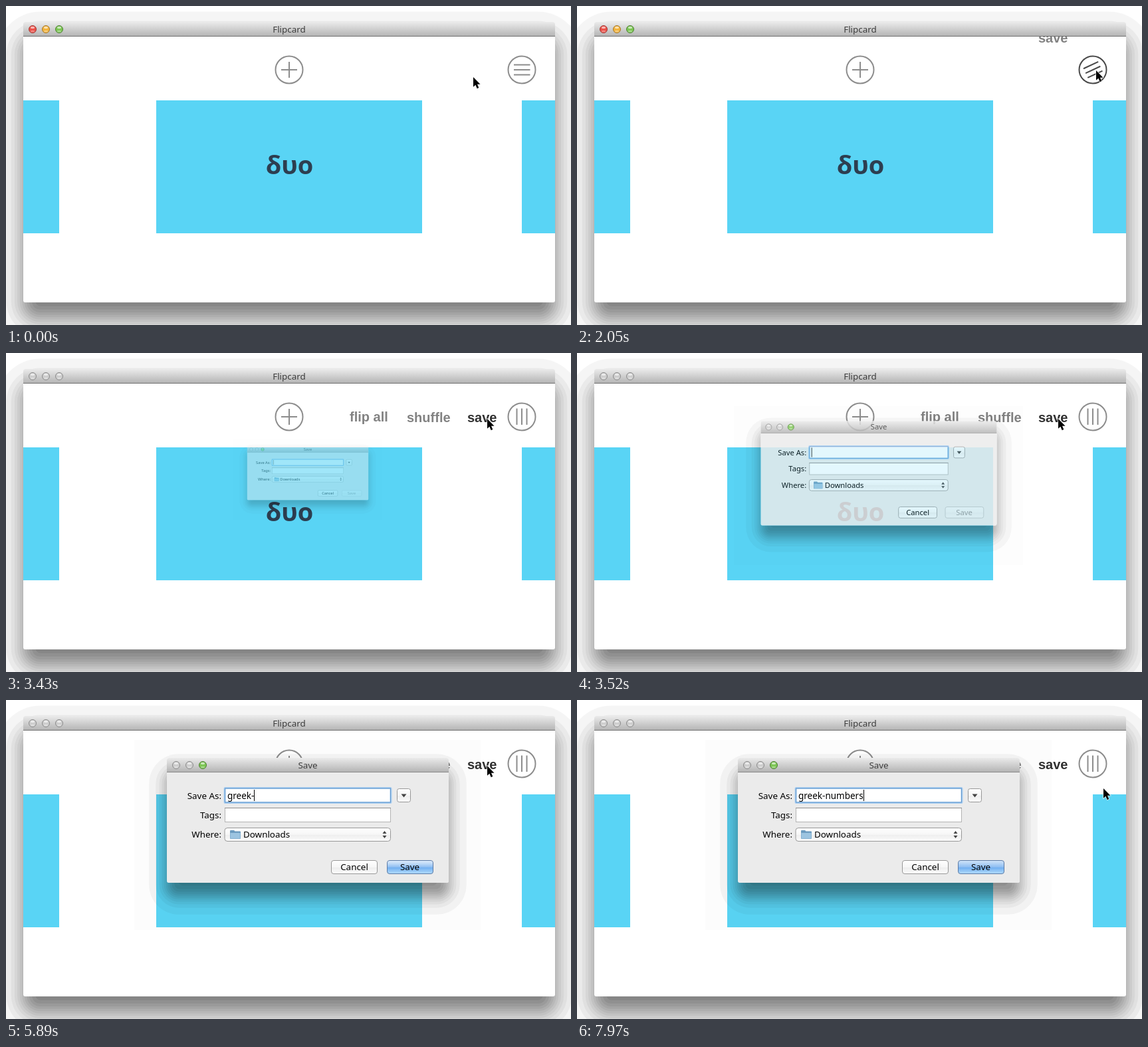
These frames come from a looping animation (850x480 px, 8000 ms). An HTML page:

```html
<!DOCTYPE html>
<html lang="en">
<head>
<meta charset="utf-8">
<title>Flipcard</title>
<style>
  html, body { margin: 0; width: 100%; height: 100%; overflow: hidden; background: #fff; }
  svg { display: block; }
  text { font: 13.4px "Noto Sans", "Open Sans", sans-serif; white-space: pre; }
  .mid { text-anchor: middle; }
  .end { text-anchor: end; }
  .menu text { font: bold 20px "Liberation Sans", Arial, sans-serif; fill: #828282; }
  .word { font: bold 38px "Noto Sans", "Open Sans", sans-serif; fill: #2d3e50; }
  .icon { fill: none; stroke: #8c8c8c; stroke-width: 2; }
  .control { fill: url(#button); stroke: #989898; }
</style>
</head>
<body>
<svg width="850" height="480" viewBox="0 0 850 480">
  <defs>
    <linearGradient id="bar" x2="0" y2="1">
      <stop stop-color="#ebebeb"/><stop offset="1" stop-color="#b5b5b5"/>
    </linearGradient>
    <linearGradient id="button" x2="0" y2="1">
      <stop stop-color="#fff"/><stop offset=".5" stop-color="#f6f6f6"/>
      <stop offset=".52" stop-color="#eee"/><stop offset="1" stop-color="#fbfbfb"/>
    </linearGradient>
    <linearGradient id="blue" x2="0" y2="1">
      <stop stop-color="#cfe3f9"/><stop offset=".5" stop-color="#8dbdf2"/>
      <stop offset=".52" stop-color="#6fadf0"/><stop offset="1" stop-color="#b2dcfb"/>
    </linearGradient>
    <linearGradient id="shine" x2="0" y2="1">
      <stop stop-color="#fff" stop-opacity=".7"/><stop offset=".5" stop-color="#fff" stop-opacity="0"/>
    </linearGradient>
    <clipPath id="content"><rect x="26" y="46" width="800" height="400"/></clipPath>
    <clipPath id="aroundDialog">
      <path clip-rule="evenodd" d="M0 0H850V480H0ZM246 87H662a4 4 0 0 1 4 4V272a3 3 0 0 1-3 3H245a3 3 0 0 1-3-3V91a4 4 0 0 1 4-4Z"/>
    </clipPath>
  </defs>

  <g id="windowShadow"></g>
  <rect x="26" y="40" width="800" height="406" rx="3" fill="#fff"/>
  <g clip-path="url(#content)">
    <path fill="#59d4f5" d="M26 142h54v200h-54zM226 142h400v200h-400zM776 142h50v200h-50z"/>
    <text class="word mid" x="426.5" y="253">δυο</text>
    <g class="icon"><circle cx="426" cy="96" r="20.5"/><path d="M414 96h24M426 84v24"/></g>
    <g class="menu" id="menu">
      <text x="694">save</text><text x="603">shuffle</text><text x="517">flip all</text>
    </g>
    <g class="icon" id="burger">
      <circle cx="776" cy="96" r="20.5"/><path id="lines" d="M764 88.5h24.5M764 96h24.5M764 103.500h24.5"/>
    </g>
  </g>
  <path fill="url(#bar)" d="M26 45V28a4 4 0 0 1 4-4H822a4 4 0 0 1 4 4V45Z"/>
  <path fill="#707070" d="M26 45h800v1h-800z"/>
  <g id="windowLights"></g>
  <text class="mid" x="426" y="39.500" fill="#3c3c3c">Flipcard</text>

  <g id="dialog">
    <g clip-path="url(#aroundDialog)">
      <rect x="193" y="60" width="521" height="286" opacity=".012"/>
      <g id="dialogShadow"></g>
    </g>
    <rect x="242" y="100" width="424" height="175" rx="3" fill="#ebebeb"/>
    <path fill="url(#bar)" d="M242 108V91a4 4 0 0 1 4-4H662a4 4 0 0 1 4 4V108Z"/>
    <path fill="#8a8a8a" d="M242 108h424v1h-424z"/>
    <g id="dialogLights"></g>
    <text class="mid" x="454" y="102.500" fill="#3c3c3c">Save</text>
    <g class="end">
      <text x="324" y="149">Save As:</text><text x="324" y="178">Tags:</text><text x="324" y="207">Where:</text>
    </g>
    <rect x="329" y="132.500" width="250" height="22" fill="#fff" stroke="#a9cdf0" stroke-width="3" rx="1"/>
    <rect x="329.500" y="133" width="249" height="21" fill="none" stroke="#6398cc"/>
    <text id="name" x="333" y="149" style="font-size:13.5px"></text>
    <rect id="caret" y="135" width="1" height="17"/>
    <rect x="329.500" y="162.500" width="249" height="21" fill="#fff" stroke="#b4b4b4"/>
    <path stroke="#8e8e8e" d="M329 162.500h250"/>
    <g class="control">
      <rect x="329" y="192.500" width="249.500" height="20" rx="4"/>
      <rect x="588.500" y="133.500" width="20" height="20" rx="3"/>
      <rect x="489.500" y="241.500" width="69" height="20" rx="3.500"/>
      <rect id="saveOff" x="573.500" y="241.500" width="69" height="20" rx="3.500" opacity=".5"/>
    </g>
    <path fill="#6d9cc0" d="M337 197q0-1 1-1h5l1.500 1.500H352q1 0 1 1V208q0 1-1 1H338q-1 0-1-1Z"/>
    <path fill="#9cc4e0" d="M337.500 200h15v8.500h-15z"/>
    <text x="357" y="207">Downloads</text>
    <path fill="#444" d="M566.500 201l3-4 3 4zM566.500 204l3 4 3-4zM594.500 141.500h8l-4 5z"/>
    <text class="mid" x="524" y="256">Cancel</text>
    <g id="saveOn">
      <rect x="573.500" y="241.500" width="69" height="20" rx="3.500" fill="url(#blue)" stroke="#5c7ba6"/>
      <rect id="pulse" x="574" y="242" width="68" height="19" rx="3" fill="url(#shine)"/>
    </g>
    <text id="saveLabel" class="mid" x="607.500" y="256">Save</text>
  </g>

  <path id="cursor" d="M0 0V14.800L3.400 11.700 5.700 17.200 8.300 16.100 6 10.700H10.500Z" stroke="#fff" stroke-width="1.200" paint-order="stroke"/>
</svg>

<script>
const LOOP = 8000;
const $ = id => document.getElementById(id);
const clamp = v => Math.min(1, Math.max(0, v));
const easeOut = p => 1 - (1 - clamp(p)) ** 3;
const smooth = p => p * p * (3 - 2 * p);

function add(parent, tag, attrs) {
  const node = document.createElementNS('http://www.w3.org/2000/svg', tag);
  for (const key in attrs) node.setAttribute(key, attrs[key]);
  parent.append(node);
}

// Stepped soft shadow: nested rounded boxes whose opacities add up to `strength`.
function shadow(parent, x, y, w, h, drop, spread, strength, bands) {
  for (let k = 1; k <= bands; k++) {
    const d = spread * 0.57 * Math.log(bands / (k - 0.5) - 1);
    const before = strength * (k - 1) / bands, after = strength * k / bands;
    add(parent, 'rect', {
      x: x - d, y: y + drop - d, width: w + 2 * d, height: h + 2 * d,
      rx: Math.max(8, d + spread * 1.2), opacity: 1 - (1 - after) / (1 - before)
    });
  }
}

function lights(parent, x, y, colors) {
  colors.forEach(([fill, stroke], i) => {
    const cx = x + 20 * i;
    add(parent, 'circle', { cx, cy: y, r: 5.5, fill, stroke });
    add(parent, 'ellipse', { cx, cy: y - 2.6, rx: 3, ry: 1.7, fill: '#fff', opacity: 0.6 });
    add(parent, 'ellipse', { cx, cy: y + 3, rx: 3.2, ry: 1.6, fill: '#fff', opacity: 0.3 });
  });
}

const gray = ['#cdcdcd', '#8b8b8b'], green = ['#7cc653', '#4f8035'];
const active = [['#ec5048', '#a33a35'], ['#f3b43c', '#a5782a'], green];

shadow($('windowShadow'), 26, 24, 800, 422, 24, 21, 0.56, 14);
shadow($('dialogShadow'), 242, 87, 424, 188, 21, 15, 0.48, 12);
lights($('dialogLights'), 256, 98, [gray, gray, green]);

const cursorPath = [
  [720, 703, 107], [1460, 779, 96.5], [1579, 779, 96.5], [1580, 781, 97], [2500, 781, 97],
  [2850, 757, 98], [3020, 724, 99], [7690, 724, 99], [7970, 792, 133]
];
const openSteps = [[3370, 0.43], [3440, 0.63], [3520, 0.837], [3580, 1]];
const fileName = 'greek-numbers';
const keyTimes = [4500, 4620, 4780, 4940, 5140, 5710, 6000, 6110, 6400, 6870, 7020, 7180, 7400];

function cursorAt(t) {
  const i = cursorPath.findIndex(p => p[0] > t);
  if (i === 0) return cursorPath[0].slice(1);
  if (i < 0) return cursorPath.at(-1).slice(1);
  const [t0, x0, y0] = cursorPath[i - 1], [t1, x1, y1] = cursorPath[i];
  const p = smooth((t - t0) / (t1 - t0));
  return [x0 + (x1 - x0) * p, y0 + (y1 - y0) * p];
}

let lightsActive = null;

function render(t) {
  const [x, y] = cursorAt(t);
  $('cursor').setAttribute('transform', `translate(${x} ${y})`);

  const overBurger = Math.hypot(x - 776, y - 96) < 21.5 && t < 7000;
  $('burger').style.stroke = overBurger ? '#484848' : '#8c8c8c';
  const turn = t < 2050 ? 0 : easeOut((t - 2000) / 500);
  $('lines').setAttribute('transform', `rotate(${-90 * turn} 776 96)`);

  [...$('menu').children].forEach((item, i) => {
    const p = t < 2050 ? 0 : easeOut((t - 2000 - 130 * i) / 500);
    item.setAttribute('y', (i === 2 ? 103 : 104) - 67 * (1 - p));
  });
  $('menu').children[0].style.fill = t >= 2960 ? '#303030' : '';

  const open = openSteps.filter(s => s[0] <= t).at(-1);
  if (lightsActive !== !open) {
    lightsActive = !open;
    $('windowLights').replaceChildren();
    lights($('windowLights'), 40, 35, lightsActive ? active : [gray, gray, gray]);
  }
  $('dialog').style.display = open ? '' : 'none';
  if (!open) return;

  const scale = open[1];
  $('dialog').setAttribute('transform', `translate(454 180.5) scale(${scale}) translate(-454 -180.5)`);
  $('dialog').setAttribute('opacity', scale);

  const typed = keyTimes.filter(k => k <= t).length;
  $('name').textContent = fileName.slice(0, typed);
  $('caret').setAttribute('x', 333 + (typed ? Math.round($('name').getComputedTextLength()) : 0));
  $('caret').style.display = !typed && t >= 3940 ? 'none' : '';
  $('saveOn').style.display = typed ? '' : 'none';
  $('saveOff').style.display = typed ? 'none' : '';
  $('saveLabel').setAttribute('fill', typed ? '#000' : '#999');
  $('pulse').setAttribute('opacity', 0.25 + 0.25 * Math.sin((t - 4500) / 1200 * 2 * Math.PI));
}

const start = performance.now();
function tick() {
  render((performance.now() - start) % LOOP);
  requestAnimationFrame(tick);
}
tick();
</script>
</body>
</html>
```
